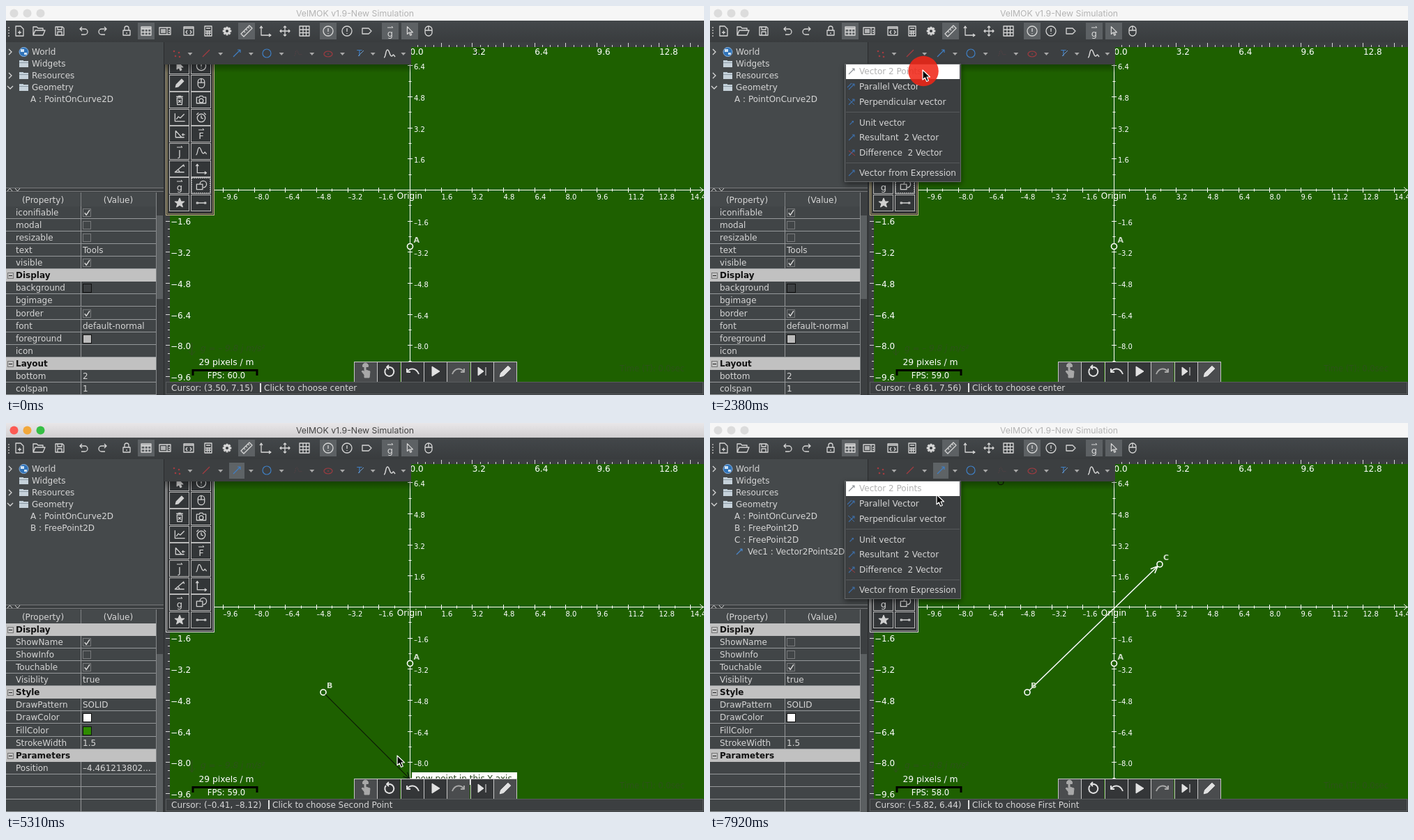
Write an HTML page with a canvas that moves like this. It is 1001 px wide and 559 px high and loops after 8 s.

```html
<!DOCTYPE html>
<html lang="en">
<head>
<meta charset="utf-8">
<title>Vector tool</title>
<style>
html,body{margin:0;width:100%;height:100%;overflow:hidden;background:#3c3f41}
canvas{display:block;width:1001px;height:559px}
</style>
</head>
<body>
<canvas id="stage" width="1001" height="559"></canvas>
<script>
const g = document.getElementById('stage').getContext('2d');
const LOOP = 8000, FPS = 13;
const OX = 579.5, OY = 264.5, UNIT = 27.92, STEP = 1.6;
const B = [455, 387], C = [645, 203], A = [579.5, 345.5];
const GREEN = '#1e6000', PANEL = '#3c3f41', LIGHT = '#d6d6d6';
const SANS = '"DejaVu Sans", sans-serif';

// Times of the events in the story
const T = {toolClick: 840, menuOpen: 1850, menuPick: 2460, pointB: 3920, pointC: 6380, menuAgain: 7620};
const clicks = [[840, 1080], [1770, 1930], [2230, 2460], [3850, 4080], [6300, 6540], [7540, 7690]];

// Pointer tip in pixels: time, x, y
const pointerKeys = [
  [230, 600, 150], [310, 520, 180], [460, 520, 180], [770, 284, 262], [1080, 284, 262],
  [1230, 300, 235], [1540, 340, 32], [1620, 344, 36], [1770, 344, 36], [1850, 350, 64],
  [2080, 350, 66], [2300, 310, 91], [2380, 305, 92], [2620, 305, 92], [3080, 528, 343],
  [3310, 528, 343], [3770, 526, 359], [3920, 455, 387], [4380, 455, 387], [4620, 490, 420],
  [4920, 440, 430], [5080, 420, 530], [5150, 420, 530], [5230, 579, 512], [5310, 561, 478],
  [5850, 690, 370], [6000, 720, 332], [6080, 770, 265], [6230, 642, 199], [6300, 642, 199],
  [6380, 645, 203], [6540, 645, 203], [6770, 680, 215], [6920, 680, 215], [7380, 345, 65],
  [7690, 345, 65], [7920, 325, 103]];
// Reported position in metres: time, x, y
const valueKeys = [
  [160, 3.5, 7.15], [230, .9, 4.1], [310, -2.1, 3], [460, -2.1, 3], [770, -10.08, .11],
  [1080, -10.08, .11], [1540, -8.61, 7.56], [2620, -8.61, 7.56], [2700, -8.2, 5.2],
  [3080, -1.6, -2.85], [3310, -1.6, -2.85], [3770, -1.4, -3.33], [3920, -4.46, -4.39],
  [4380, -4.46, -4.39], [4620, -3.2, -5.6], [4920, -5, -5.9], [5080, -5.7, -9.5],
  [5150, -5.7, -9.5], [5230, 0, -8.86], [5310, -.41, -8.12], [5850, 4, -3.8], [6000, 5.1, -2.4],
  [6080, 6.8, 0], [6230, 2.24, 2.29], [6300, 2.24, 2.29], [6380, 2.35, 2.2], [6540, 2.35, 2.2],
  [6770, 3.6, 1.8], [6920, 3.6, 1.8], [7300, -5.82, 6.44]];

const ICON = {
  doc: 'M-5-7H2L6-3V7H-5ZM-2 2H3M.5-.5V4.5',
  open: 'M-8 6V-6H-3L-1-4H6V-1M-8 6L-5-1H9L6 6Z',
  save: 'M-6-6H4L6-4V6H-6ZM-3-6V-2H3V-6M-3 6V1H3V6',
  undo: 'M-5-3H2A4 4 0 0 1 2 5H-3M-2-6L-5-3L-2 0',
  redo: 'M5-3H-2A4 4 0 0 0-2 5H3M2-6L5-3L2 0',
  lock: 'M-5-1H5V6H-5ZM-3-1V-4A3 3 0 0 1 3-4V-1M0 2V4',
  table: 'M-7-6H7V6H-7ZM-7-4H7M-7-3H7M-7 1.5H7M-2-3V6M2.5-3V6',
  list: 'M-8-5H8V5H-8ZM3-5V5M-6-2H1M-6 0H1M-6 2H1M5-1H7M5 2H7',
  code: 'M-7-6H7V6H-7ZM-7-4H7M-2-1L-4 1.5L-2 4M2-1L4 1.5L2 4',
  calc: 'M-5-7H5V7H-5ZM-3-4H3M-4 0H4M-4 3H4M-1.5-1V6M1.5-1V6',
  gear: 'M0-4A4 4 0 1 1 0 4A4 4 0 1 1 0-4M0-7V-4M0 4V7M-7 0H-4M4 0H7M-5-5L-3-3M3 3L5 5M-5 5L-3 3M3-3L5-5',
  ruler: 'M-8 4L4-8L8-4L-4 8ZM-4 0L-2 2M-1-3L1-1M2-6L4-4',
  axes: 'M-6-7V6H8M-8-4L-6-7L-4-4M5 4L8 6L5 8',
  move: 'M0-7V7M-7 0H7M-2-5L0-7L2-5M-2 5L0 7L2 5M-5-2L-7 0L-5 2M5-2L7 0L5 2',
  grid: 'M-7-7H7V7H-7ZM-7-2H7M-7 2.5H7M-2-7V7M2.5-7V7',
  info: 'M-7 0A7 7 0 1 1 7 0A7 7 0 1 1-7 0M0-4V1M0 3V4',
  tag: 'M-6-4H3L7 0L3 4H-6Z',
  arrow: 'M-4-7V5L-1 2L1 7L3 6L1 2H5Z',
  mouse: 'M-5-2A5 5 0 0 1 5-2V2A5 5 0 0 1-5 2ZM-5-1H5M0-7V-1',
  pencil: 'M-6 6L-5 2L3-6L6-3L-2 5Z',
  trash: 'M-5-5H5M-2-6H2M-4-3H4L3.5 7H-3.5ZM-2 0L2 4M2 0L-2 4',
  camera: 'M-7-4H-3L-2-6H2L3-4H7V5H-7ZM-3 1A3 3 0 1 1 3 1A3 3 0 1 1-3 1',
  chart: 'M-7-6V6H8M-5 3L-2-1L1 1L7-5',
  clock: 'M-6 1A6 6 0 1 1 6 1A6 6 0 1 1-6 1M0-3V1L3 2M-7-4L-4-7M7-4L4-7',
  slope: 'M-6-5V5H7M-6-5L3 5M5-1V3M3 1H8',
  curve: 'M-8 5C-5 5-6-6-3-6S0 3 3 3S4-2 8 4',
  angle: 'M6-6L-7 5H7M0 5A6 6 0 0 0-3 1M4-4L6-6L7-3',
  shapes: 'M-7-2H2V6H-7ZM-2-2A5 5 0 1 1 3 3',
  star: 'M0-7L2-2H7L3 1L4.500 6L0 3L-4.500 6L-3 1L-7-2H-2Z',
  link: 'M-5 0H5M-7-1H-5V1H-7ZM5-1H7V1H5Z',
  restart: 'M-4-4A6.500 6.500 0 1 0 2-6L-3-6M0-9L-3-6L0-3',
  back: 'M-8 1C-4-5 5-6 9 4M-8-4V1H-3',
  forth: 'M8 1C4-5-5-6-9 4M8-4V1H3',
  play: 'M-5-7L6 0L-5 7Z',
  skip: 'M-6-6L2 0L-6 6ZM5-6V6',
  hand: 'M-2 9V5L-6 0L-4-1L-2 1V-8H0V-2L6 0L5 9ZM-4-6A4 4 0 1 1 3-6',
  check: 'M-4-1L-1 3L5-6',
  segment: 'M-5 5L5-5',
  vector: 'M-5 5L5-5M1-5H5V-1',
  circle: 'M-6 0A6 6 0 1 1 6 0A6 6 0 1 1-6 0',
  ellipse: 'M-6 0A6 4 0 1 1 6 0A6 4 0 1 1-6 0M0-1V1'
};

const rect = (x, y, w, h, c) => { g.fillStyle = c; g.fillRect(x, y, w, h); };
function box(x, y, w, h, c, lw = 1) {
  g.strokeStyle = c; g.lineWidth = lw; g.strokeRect(x + .5, y + .5, w - 1, h - 1);
}
function line(x1, y1, x2, y2, c, lw = 1) {
  g.strokeStyle = c; g.lineWidth = lw;
  g.beginPath(); g.moveTo(x1, y1); g.lineTo(x2, y2); g.stroke();
}
function ring(x, y, r, stroke, lw, fill) {
  g.beginPath(); g.arc(x, y, r, 0, 7);
  if (fill) { g.fillStyle = fill; g.fill(); }
  if (stroke) { g.strokeStyle = stroke; g.lineWidth = lw; g.stroke(); }
}
// y is the middle of the letters
function text(s, x, y, c = LIGHT, size = 12, style = '', align = 'left', family = SANS) {
  g.font = `${style} ${size}px ${family}`;
  g.textAlign = align; g.fillStyle = c;
  g.fillText(s, x, y + size * .36);
}
function icon(name, x, y, c = LIGHT, lw = 1.3, scale = 1, fill = false) {
  g.save(); g.translate(x, y); g.scale(scale, scale);
  const p = new Path2D(ICON[name]);
  g.strokeStyle = g.fillStyle = c; g.lineWidth = lw / scale; g.lineJoin = 'round';
  if (fill) g.fill(p);
  g.stroke(p); g.restore();
}
function shade(x, y, w, h, a, b) {
  const s = g.createLinearGradient(0, y, 0, y + h);
  s.addColorStop(0, a); s.addColorStop(1, b);
  rect(x, y, w, h, s);
}
function letter(s, x, y) {
  text(s, x, y + 2, LIGHT, 13, '', 'center');
  line(x - 4, y - 6, x + 4, y - 6, LIGHT);
  line(x + 2, y - 8, x + 4, y - 6, LIGHT);
}
function track(keys, t) {
  if (t <= keys[0][0]) return keys[0].slice(1);
  for (let i = 1; i < keys.length; i++) {
    const [t1, x1, y1] = keys[i], [t0, x0, y0] = keys[i - 1];
    if (t <= t1) {
      const k = (t - t0) / (t1 - t0);
      return [x0 + (x1 - x0) * k, y0 + (y1 - y0) * k];
    }
  }
  return keys[keys.length - 1].slice(1);
}
const toPixel = ([x, y]) => [OX + x * UNIT, OY - y * UNIT];
const menuShown = t => t >= T.menuOpen && t < T.menuPick || t >= T.menuAgain;

function titleBar(active) {
  active ? shade(0, 0, 1001, 21, '#e9e7e9', '#d0ced0') : rect(0, 0, 1001, 21, '#f6f6f6');
  ['#fc5b54', '#f2a83b', '#36bf45'].forEach((c, i) =>
    ring(11.5 + 19 * i, 10.5, 6, null, 0, active ? c : '#dcdcdc'));
  text('VelMOK v1.9-New Simulation', 500.5, 10.5, active ? '#444' : '#b4b4b4', 12.3, '', 'center', 'Inter, sans-serif');
}

function toolbar() {
  shade(0, 21, 1001, 31, '#43474a', '#393c3e');
  for (let y = 30; y < 45; y += 4) rect(3, y, 2, 2, '#999');
  for (const x of [201, 345, 462, 551, 579]) rect(x - 12, 24, 24, 24, '#5d6164');
  const items = [['doc', 19], ['open', 47], ['save', 77], ['undo', 111], ['redo', 139], ['lock', 173],
    ['table', 201], ['list', 228], ['code', 262], ['calc', 290], ['ruler', 345], ['axes', 372],
    ['move', 400], ['grid', 428], ['info', 462], ['info', 489], ['tag', 517], ['mouse', 606]];
  for (const [n, x] of items) icon(n, x, 36);
  icon('gear', 317, 36, LIGHT, 3, .9);
  icon('arrow', 579, 36, LIGHT, 1.2, .9);
  letter('g', 551, 37);
}

function chevron(x, y, open) {
  g.strokeStyle = LIGHT; g.lineWidth = 1.3; g.beginPath();
  open ? (g.moveTo(x - 4, y - 2), g.lineTo(x, y + 2), g.lineTo(x + 4, y - 2))
       : (g.moveTo(x - 2, y - 4), g.lineTo(x + 2, y), g.lineTo(x - 2, y + 4));
  g.stroke();
}

function tree(t) {
  rect(0, 52, 227, 210, '#45494b');
  ['World', 'Widgets', 'Resources', 'Geometry'].forEach((s, i) => {
    const y = 66 + 17 * i;
    if (i !== 1) chevron(6, y, i === 3);
    if (i) { rect(19, y - 5, 6, 3, '#b9cbd6'); rect(19, y - 4, 13, 9, '#c6d2da'); rect(19, y - 2, 13, 1, '#8b9aa5'); }
    else {
      ring(25.5, y, 6.5, '#8ab4e0', 1, '#2f72b8');
      rect(21, y - 4, 5, 4, '#cfe2f2'); rect(26, y + 1, 4, 3, '#cfe2f2');
    }
    text(s, 37, y);
  });
  text('A : PointOnCurve2D', 35, 134);
  if (t >= T.pointB) text('B : FreePoint2D', 35, 151);
  if (t >= T.pointC) {
    text('C : FreePoint2D', 35, 168);
    icon('vector', 42, 185, '#4a86c8', 1.2, .8);
    text('Vec1 : Vector2Points2D', 54, 185);
  }
}

const tick = 'on', empty = 'off';
const head = s => [s];
const toolProps = [['iconifiable', tick], ['modal', empty], ['resizable', empty], ['text', 'Tools'],
  ['visible', tick], head('Display'), ['background', '#3c3f41'], ['bgimage', ''], ['border', tick],
  ['font', 'default-normal'], ['foreground', '#bbbbbb'], ['icon', ''], head('Layout'), ['bottom', '2'], ['colspan', '1']];
const shapeProps = (named, fill, pos) => [head('Display'), ['ShowName', named], ['ShowInfo', empty],
  ['Touchable', tick], ['Visiblity', 'true'], head('Style'), ['DrawPattern', 'SOLID'], ['DrawColor', '#ffffff'],
  ['FillColor', fill], ['StrokeWidth', '1.5'], head('Parameters'), pos, ['', ''], ['', ''], ['', '']];
const pointProps = shapeProps(tick, '#2e8b00', ['Position', '-4.461213802...']);
const vectorProps = shapeProps(empty, '', ['', '']);

function properties(t) {
  rect(0, 261, 227, 298, PANEL);
  line(0, 261.5, 226, 261.5, '#77797b');
  line(0, 266.5, 226, 266.5, '#77797b');
  g.strokeStyle = LIGHT; g.lineWidth = 1; g.beginPath();
  g.moveTo(2, 266); g.lineTo(5.5, 262); g.lineTo(9, 266);
  g.moveTo(13, 262); g.lineTo(16.5, 266); g.lineTo(20, 262); g.stroke();
  rect(0, 268, 215, 20, '#45494b');
  text('(Property)', 53, 279, LIGHT, 12, '', 'center');
  text('(Value)', 161, 279, LIGHT, 12, '', 'center');
  line(107.5, 268, 107.5, 288, '#808385');

  const rows = t < T.pointB ? toolProps : t < T.pointC ? pointProps : vectorProps;
  rows.forEach(([key, value], i) => {
    const y = Math.round(297 + 18.07 * i), top = y - 9;
    if (value === undefined) {
      rect(0, top, 215, 18, '#c1c1c1');
      box(2, y - 4, 9, 9, '#777'); line(4, y + .5, 9, y + .5, '#222');
      text(key, 14, y, '#111', 12, 'bold');
      return;
    }
    rect(0, top, 215, 18, '#414547');
    line(0, top + 17.5, 215, top + 17.5, '#95989a');
    line(107.5, top, 107.5, top + 18, '#95989a');
    text(key, 14, y);
    if (value === tick || value === empty) {
      box(110, y - 6, 12, 12, '#77797b');
      if (value === tick) icon('check', 116, y + 1, LIGHT, 1.5, .8);
    } else if (value[0] === '#') {
      rect(110, y - 6, 13, 13, value); box(110, y - 6, 13, 13, '#111');
    } else text(value.replace('-4', '–4'), 110, y);
  });
  line(215.5, 268, 215.5, 559, '#85888a');
  const first = t < T.pointB;
  rect(216, first ? 301 : 332, 9, first ? 120 : 227, '#5b5f61');
  line(226.5, 52, 226.5, 559, '#2b2d2e');
}

function plane() {
  rect(227, 52, 774, 488, GREEN);
  const faint = '#2d5318';
  line(266.5, 484, 266.5, 502, faint, 1.5);
  line(262, 496, 266.5, 502, faint); line(271, 496, 266.5, 502, faint);
  text('g = – 9.8 j m/s²', 279, 492, faint, 12, 'italic');
  text('Time (T): 0.0sec', 880, 521, faint, 11.5);

  line(227, OY, 1001, OY, '#fff');
  line(OX, 52, OX, 540, '#fff');
  line(995, OY - 4, 1000, OY, '#fff'); line(995, OY + 4, 1000, OY, '#fff');
  const label = v => v < 0 ? '–' + (-v).toFixed(1) : v.toFixed(1);
  for (let i = -12; i <= 18; i++) {
    const d = i * UNIT * STEP / 2, big = i % 2 === 0, r = big ? 3.5 : 2;
    const x = Math.floor(OX + d) + .5, y = Math.floor(OY - d) + .5;
    line(x, OY - r, x, OY + r, '#fff');
    line(OX - r, y, OX + r, y, '#fff');
    if (!big || !i) continue;
    const v = i / 2 * STEP;
    text(label(v), x, 274, '#fff', 10);
    text(label(v), 585, y + 1.5, '#fff', 10);
  }
  text('Origin', 579, 272.5, '#fff', 12, '', 'center');
}

function rulers() {
  rect(227, 52, 774, 7, PANEL);
  rect(227, 52, 8, 488, PANEL);
  const sub = UNIT * STEP / 4;
  for (let i = -32; i < 38; i++) {
    const r = i % 4 ? 3 : 6;
    const x = Math.floor(OX + i * sub) + .5, y = Math.floor(OY + i * sub) + .5;
    if (x > 235) line(x, 59 - r, x, 59, '#d8d8d8');
    if (y > 59 && y < 540) line(235 - r, y, 235, y, '#d8d8d8');
  }
  for (let i = 0; i < 5; i++) text((i * 3.2).toFixed(1), OX + i * 3.2 * UNIT, 66, '#fff');
  for (let i = 1; i < 7; i++) text('−' + (i * STEP).toFixed(1), 236, OY + i * STEP * UNIT + 1, '#fff');
}

function arrowLine([x1, y1], [x2, y2], c, lw, r) {
  const a = Math.atan2(y2 - y1, x2 - x1);
  const ex = x2 - r * Math.cos(a), ey = y2 - r * Math.sin(a);
  line(x1 + 4 * Math.cos(a), y1 + 4 * Math.sin(a), ex, ey, c, lw);
  for (const s of [-.4, .4]) line(ex, ey, ex - 11 * Math.cos(a + s), ey - 11 * Math.sin(a + s), c, lw);
}
function point(p, name) {
  ring(p[0], p[1], 4, '#fff', 1.6, GREEN);
  text(name, p[0] + 5, p[1] - 9.5, '#cfdcc8', 11, 'bold');
}

function drawing(t, value) {
  if (t >= T.pointC) arrowLine(B, C, '#fff', 1.5, 4);
  point(A, 'A');
  if (t >= T.pointB) point(B, 'B');
  if (t >= T.pointC) point(C, 'C');
  const building = t >= T.pointB && t < T.pointC;
  if (building) {
    const end = toPixel(track(valueKeys, t - 80));
    if (Math.hypot(end[0] - B[0], end[1] - B[1]) > 8) arrowLine(B, end, '#0c1a06', 1.2, 0);
    if (Math.abs(end[0] - OX) < 8) {
      rect(582, 502, 151, 18, '#fff');
      text('new point in this Y axis', 587, 511, '#24401a', 12);
    }
  } else if (t < 770 || t > 2620) {
    const [x, y] = toPixel(value);
    ring(x, y, 4, '#0c1a06', 1.3);
  }
}

function toolbox(t) {
  const chosen = t < T.pointB;
  rect(229, 70, 70, 231, '#2f3133');
  box(229, 70, 70, 231, chosen ? '#c9b98c' : '#d8d8d8');
  box(231, 70, 66, 229, chosen ? '#8f845f' : '#909090');
  const names = ['arrow', 'info', 'pencil', 'mouse', 'trash', 'camera', 'chart', 'clock', 'slope', 'F',
    'J', 'curve', 'angle', 'axes', 'g', 'shapes', 'star', 'link'];
  names.forEach((n, i) => {
    const left = i % 2 ? 265 : 234, y = Math.round(86 + 24.6 * (i >> 1));
    rect(left, y - 12, 29, 24, '#333638');
    box(left, y - 12, 29, 24, '#b8b8b8');
    if (chosen && n === 'shapes') {
      g.setLineDash([1, 2]); box(left + 1, y - 11, 27, 22, '#fff'); g.setLineDash([]);
    }
    if (n.length === 1) letter(n, left + 15, y);
    else icon(n, left + 15, y, '#d0d0d0', 1.3, .95, ['pencil', 'star', 'arrow'].includes(n));
  });
}

function geometryBar(t) {
  shade(227, 84, 355, 12, 'rgba(0,0,0,.3)', 'rgba(0,0,0,0)');
  rect(227, 52, 354, 32, PANEL);
  if (t >= T.menuPick) rect(320, 57, 22, 23, '#5e6366');
  const red = '#a33b40', blue = '#3f7fc4';
  for (const [x, y] of [[241, 65], [248, 67], [243, 72], [249, 73]]) ring(x, y, 1.3, null, 0, red);
  icon('segment', 287, 68, red, 1.2);
  icon('vector', 331, 68, blue, 1.2);
  icon('circle', 374, 68, blue, 1.2);
  g.setLineDash([2, 2]); icon('curve', 419, 68, '#5a4145', 1, .7); g.setLineDash([]);
  icon('ellipse', 462, 69, red, 1.2);
  text('T', 507, 68, blue, 12, '', 'center');
  icon('segment', 509, 68, '#6f9fd0', 1, .8);
  icon('curve', 550, 69, LIGHT, 1.5);
  for (let i = 0; i < 8; i++) {
    const x = 264 + 43.7 * i;
    g.fillStyle = '#a8a8a8'; g.beginPath();
    g.moveTo(x - 3.5, 67); g.lineTo(x + 3.5, 67); g.lineTo(x, 71); g.fill();
  }
}

function bottom(t, value) {
  const fps = t < 500 ? 60 : t < 1500 ? 58 : t < 5800 ? 59 : 58;
  text('29 pixels / m', 316, 512, '#fff', 12.3, '', 'center');
  g.strokeStyle = '#000'; g.lineWidth = 3; g.lineJoin = 'miter';
  g.strokeRect(0, 0, 0, 0);
  g.beginPath(); g.moveTo(268, 531); g.lineTo(268, 523.5); g.lineTo(360, 523.5); g.lineTo(360, 531); g.stroke();
  text(`FPS: ${fps}.0`, 316, 531, '#fff', 11.6, '', 'center');

  ['hand', 'restart', 'back', 'play', 'forth', 'skip', 'pencil'].forEach((n, i) => {
    const x = Math.round(499 + 33.3 * i);
    rect(x, 511, 33, 29, ['hand', 'forth', 'pencil'].includes(n) ? '#4a4c4e' : '#343638');
    const solid = ['hand', 'play', 'skip', 'pencil'].includes(n);
    icon(n, x + 17, 525, n === 'hand' || n === 'forth' ? '#a8a8a8' : '#e2e2e2', solid ? 1 : 2, n === 'pencil' ? 1.3 : 1, solid);
    line(x + .5, 511, x + .5, 540, '#c8c8c8');
  });
  box(499, 511, 234, 30, '#c8c8c8');

  rect(227, 540, 774, 19, PANEL);
  box(229, 540, 771, 18, '#595c5e');
  const num = v => v.toFixed(2).replace('-', '–');
  const s = `Cursor: (${num(value[0])}, ${num(value[1])})`;
  text(s, 237, 549);
  const bar = Math.round(237 + g.measureText(s).width + 9);
  rect(bar, 542, 2, 13, '#e0e0e0');
  const message = t >= 460 && t < 1080 ? '' : 'Click to choose ' +
    (t < T.menuPick ? 'center' : t >= T.pointB && t < T.pointC ? 'Second Point' : 'First Point');
  text(message, bar + 6, 549);
}

function menu() {
  g.save();
  g.shadowColor = 'rgba(0,0,0,.5)'; g.shadowBlur = 8; g.shadowOffsetY = 3;
  rect(193, 83, 167, 170, PANEL);
  g.restore();
  box(193, 83, 167, 170, '#66696b');
  rect(195, 84, 163, 21, '#fff');
  const items = [['Vector 2 Points', 94], ['Parallel Vector', 116], ['Perpendicular vector', 138],
    ['Unit vector', 168], ['Resultant  2 Vector', 189], ['Difference  2 Vector', 211], ['Vector from Expression', 240]];
  items.forEach(([s, y], i) => {
    icon('vector', 203, y, i ? '#3d6ea8' : '#8a8f94', 1.1, i === 3 ? .5 : .8);
    if (i === 1) icon('segment', 200, y - 2, '#3d6ea8', 1.1, .6);
    if (i === 2) line(198, y - 5, 207, y + 4, '#3d6ea8');
    if (i === 5) line(199, y - 3, 208, y + 4, '#a33b40');
    text(s, 214, y, i ? LIGHT : '#b2b2b2');
  });
  for (const y of [152.5, 225.5]) line(195, y, 358, y, '#57595b');
}

function pointer(t) {
  if (t < 230) return;
  const [x, y] = track(pointerKeys, t);
  const click = clicks.find(([a, b]) => t >= a && t < b);
  if (click) ring(x + 1, y + 1.5, Math.min(22, 18 + (t - click[0]) / 40), null, 0, 'rgba(240,38,24,.87)');
  g.save(); g.translate(x, y);
  const p = new Path2D('M0 0V14L3.3 11L5.700 16.500L8.300 15.300L6 10H10.500Z');
  g.fillStyle = '#000'; g.strokeStyle = '#fff'; g.lineWidth = 1.2; g.lineJoin = 'round';
  g.fill(p); g.stroke(p); g.restore();
}

function draw(t) {
  const value = track(valueKeys, t), open = menuShown(t);
  plane();
  drawing(t, value);
  rulers();
  toolbox(t);
  geometryBar(t);
  bottom(t, value);
  tree(t);
  properties(t);
  toolbar();
  titleBar(t >= T.toolClick && !open);
  if (open) menu();
  pointer(t);
}

const start = performance.now();
function loop() {
  const t = Math.max(0, performance.now() - start) % LOOP;
  const step = Math.floor(t * FPS / 1000 + .07) % (LOOP * FPS / 1000);
  draw(Math.round(step * 100 / FPS) * 10);
  requestAnimationFrame(loop);
}
loop();
</script>
</body>
</html>
```
